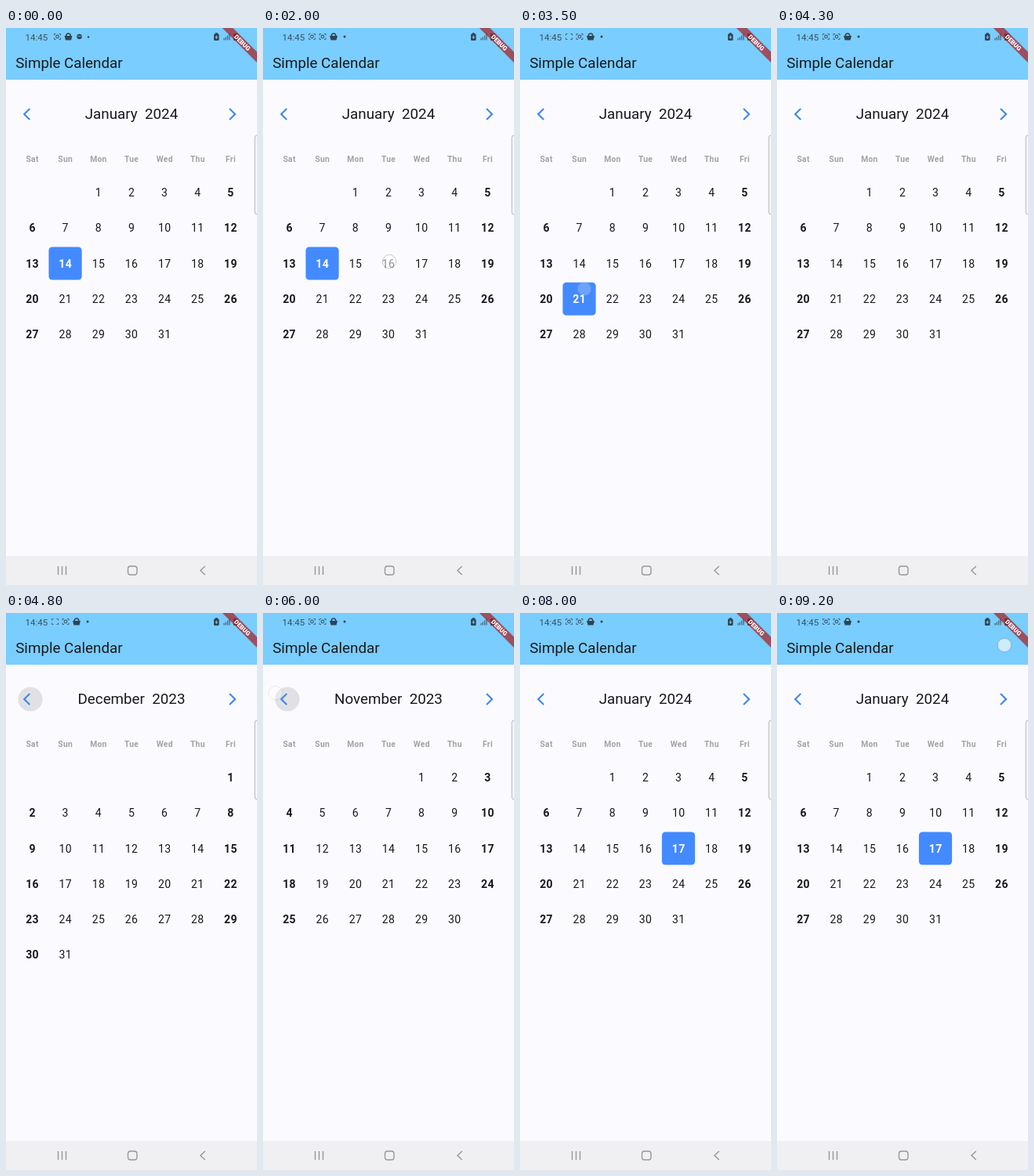
Animation, 320 px wide and 711 px high, one loop 9300 ms. Source, as an HTML page:

```html
<!DOCTYPE html>
<html lang="en">
<head>
<meta charset="utf-8">
<title>Simple Calendar</title>
<style>
  html, body { margin: 0; width: 100%; height: 100%; overflow: hidden; background: #fbfbff; }
  svg { display: block; width: 320px; height: 711px; font-family: Roboto, sans-serif; }
  text { white-space: pre; fill: #18191c; }
  .mid { text-anchor: middle; }
  .head { font-size: 18.8px; }
  .week { font-size: 10.3px; font-weight: 700; letter-spacing: .3px; fill: #a2a2a7; }
  .day { font-size: 14px; letter-spacing: .4px; }
  .bold { font-weight: 700; }
  .picked { fill: #fff; }
  .line { fill: none; stroke-width: 1.4; }
  .arrow { fill: none; stroke: #3f87ea; stroke-width: 2.1; }
</style>
</head>
<body>
<svg viewBox="0 0 320 711">
  <defs>
    <g id="focus" class="line" stroke="#3f5e70" stroke-width="1">
      <path d="M-4-1.5V-3.5H-2M2-3.5H4V-1.5M4 1.5V3.5H2M-2 3.5H-4V1.5" style="stroke-width:1"/>
    </g>
    <circle id="lens" r="1.8" fill="none" stroke="#3f5e70" stroke-width="1.2"/>
    <g id="basket">
      <path d="M-5-1H5L3.5 4.5H-3.5Z" fill="#2f4452"/>
      <path d="M-2.8-1Q-2.5-4 0-4T2.8-1" fill="none" stroke="#2f4452" stroke-width="1.6"/>
    </g>
  </defs>

  <rect width="320" height="711" fill="#fbfbff"/>
  <rect width="320" height="66" fill="#7acdff"/>
  <text x="24.5" y="15.6" font-size="11.5" style="fill:#36505f">14:45</text>
  <g id="early">
    <use href="#focus" x="65.5" y="11"/><use href="#lens" x="65.5" y="11"/>
    <use href="#basket" x="79.5" y="11"/>
    <circle cx="93.5" cy="11" r="3.2" fill="#2f4452"/>
    <path d="M91.5 10.5H95.5" stroke="#7acdff" stroke-width=".8"/>
    <circle cx="105" cy="11.5" r="1.2" fill="#2f4452"/>
  </g>
  <g id="late">
    <use href="#focus" x="62.5" y="11"/><use href="#lens" id="blink" x="62.5" y="11"/>
    <use href="#focus" x="76" y="11"/><use href="#lens" x="76" y="11"/>
    <use href="#basket" x="90" y="11"/>
    <circle cx="104" cy="11" r="1.5" fill="#2f4452"/>
  </g>
  <rect x="265" y="7.5" width="6.6" height="8.5" rx="1.3" fill="#2f4452"/>
  <rect x="266.8" y="6.2" width="3" height="2" fill="#2f4452"/>
  <path d="M268.3 9.5V14M266.5 11.8H270" stroke="#9bd0ee" stroke-width=".9"/>
  <path d="M278 15.5V13M280.3 15.5V11.5M282.6 15.5V9.5M285 15.5V7" stroke="#47697c" stroke-width="1.3"/>
  <rect x="290" y="7" width="6" height="9" rx="1" fill="#2f4452"/>
  <text class="head" x="12.2" y="51">Simple Calendar</text>

  <g id="ripples"></g>
  <path class="arrow" d="M30.3 103L23.2 110L30.3 117M285 103L292.1 110L285 117"/>
  <text id="month" class="head mid" x="160" y="116.3"></text>
  <g id="week"></g>
  <g id="days"></g>

  <rect x="317.2" y="137" width="8" height="101" rx="3" fill="#f5f5f8" stroke="#b5b5ba"/>
  <rect y="674" width="320" height="37" fill="#f0eff2"/>
  <g class="line" stroke="#97979c">
    <path d="M66.5 687V698M71.5 687V698M76.5 687V698"/>
    <rect x="155.5" y="687" width="11.5" height="11" rx="3.2"/>
    <path d="M253.8 687L248 692.5L253.8 698"/>
  </g>

  <g id="touches"></g>
  <g transform="translate(320 0) rotate(45)">
    <rect x="-36" y="21.3" width="72" height="10.4" fill="#000" opacity=".12"/>
    <rect x="-36" y="21.8" width="72" height="9.3" fill="#b71c1c" opacity=".66"/>
    <text class="mid" y="29.3" font-size="7.9" font-weight="900" style="fill:#fff">DEBUG</text>
  </g>
</svg>
<script>
const LOOP = 9300, STEP = 100;
const $ = id => document.getElementById(id);

const MONTHS = {
  jan: { title: 'January  2024', first: 2, count: 31 },
  dec: { title: 'December  2023', first: 6, count: 31 },
  nov: { title: 'November  2023', first: 4, count: 30 }
};
// start, month, selected day
const STATES = [
  [0, 'jan', 14], [2100, 'jan', 16], [2700, 'jan', 0], [3500, 'jan', 21], [4200, 'jan', 0],
  [4600, 'dec', 0], [6000, 'nov', 0], [6700, 'dec', 0], [7300, 'jan', 17]
];
// start, x, y
const TAPS = [
  [1900, 161, 298], [2500, 161, 298], [3300, 82, 333], [4000, 82, 333], [4400, 27, 108],
  [5800, 16, 102], [6500, 297, 107], [7100, 297, 107], [9200, 290, 41]
];
const TAP_FADE = [1, .85, .35];
// start, length, x
const RIPPLES = [[4400, 800, 31], [5800, 600, 31], [6500, 600, 289], [7100, 600, 289]];

const colX = c => 33.4 + 42.15 * c;
const rowY = r => 210 + 45.25 * r;

function add(parent, tag, attrs, text = '') {
  const el = document.createElementNS('http://www.w3.org/2000/svg', tag);
  for (const key in attrs) el.setAttribute(key, attrs[key]);
  el.textContent = text;
  parent.append(el);
  return el;
}

['Sat', 'Sun', 'Mon', 'Tue', 'Wed', 'Thu', 'Fri'].forEach((name, c) =>
  add($('week'), 'text', { class: 'week mid', x: colX(c) + .2, y: 171.3 }, name));

const ripples = RIPPLES.map(([, , x]) =>
  add($('ripples'), 'circle', { cx: x, cy: 110, r: 15.6, fill: '#000' }));
const touches = TAPS.map(([, x, y]) =>
  add($('touches'), 'circle', { cx: x, cy: y, r: 8.7, fill: 'rgba(255,255,255,.62)', stroke: 'rgba(125,125,135,.45)' }));

function drawMonth([, key, picked]) {
  const { title, first, count } = MONTHS[key];
  $('month').textContent = title;
  $('days').replaceChildren();
  for (let day = 1; day <= count; day++) {
    const slot = first + day - 1, col = slot % 7;
    const x = colX(col), y = rowY(Math.floor(slot / 7));
    const on = day === picked;
    if (on) add($('days'), 'rect', { x: x - 21.1, y: y - 21, width: 42.2, height: 42, rx: 4.5, fill: '#448aff' });
    const bold = on || col === 0 || col === 6;
    add($('days'), 'text', { class: `day mid${bold ? ' bold' : ''}${on ? ' picked' : ''}`, x: x + .2, y: y + 5 }, day);
  }
}

function rippleLevel(age, length) {
  if (age < 0 || age >= length) return 0;
  return Math.min(1, age / 200, (length - age) / 300);
}

let shown;
function frame(now) {
  const t = Math.floor(now % LOOP / STEP) * STEP;
  const state = STATES.findLast(s => s[0] <= t);
  if (state !== shown) drawMonth(shown = state);

  $('early').style.display = t < 100 ? '' : 'none';
  $('late').style.display = t < 100 ? 'none' : '';
  $('blink').style.display = Math.floor(t / 500) % 2 ? 'none' : '';

  ripples.forEach((el, i) => {
    const [start, length] = RIPPLES[i];
    el.style.opacity = .1 * rippleLevel(t - start, length);
  });
  touches.forEach((el, i) => {
    el.style.opacity = TAP_FADE[(t - TAPS[i][0]) / STEP] || 0;
  });
}

const origin = performance.now();
function tick() {
  frame(performance.now() - origin);
  requestAnimationFrame(tick);
}
tick();
</script>
</body>
</html>
```
